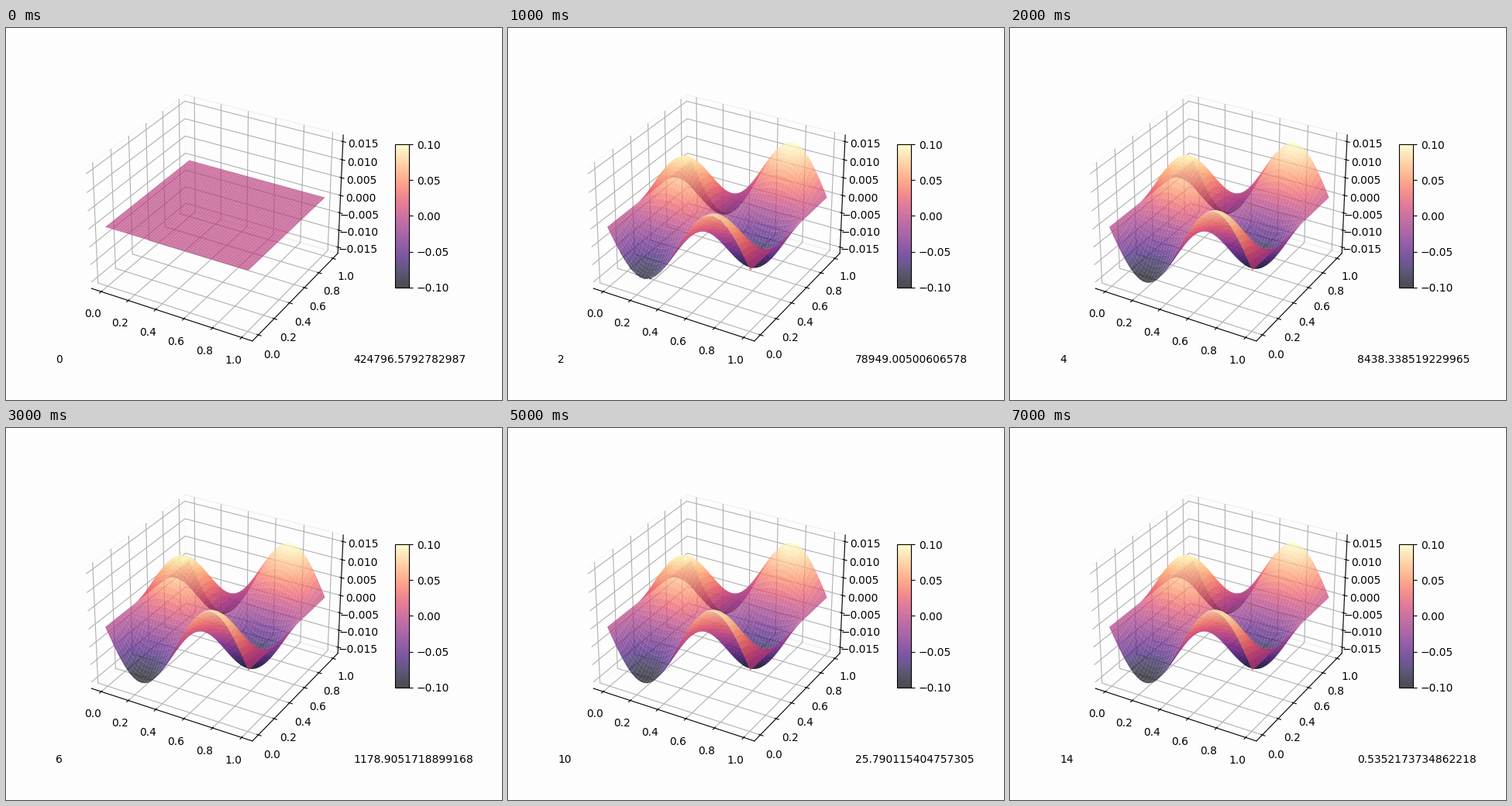
These frames come from a looping animation (640 by 480 pixels, 7.5 s). A matplotlib script:

```python
import numpy as np
import matplotlib.pyplot as plt
from matplotlib.animation import FuncAnimation
from matplotlib.cm import ScalarMappable
from matplotlib.colors import Normalize

BG = "#fdfdfd"
ALPHA = 0.7
N = 344
RESIDUALS = [
    "424796.5792782987", "285250.62804298", "78949.00500606578",
    "25810.416283759142", "8438.338519229965", "3154.086127395418",
    "1178.9051718899168", "453.44871930562817", "174.39562081734925",
    "67.07218435190264", "25.790115404757305", "9.790245318672049",
    "3.716382905147263", "1.4106529384710562", "0.5352173734862218",
]

grid = np.linspace(0, 1, N)
X, Y = np.meshgrid(grid, grid)
EXACT = -np.sin(2 * np.pi * X) * np.cos(2 * np.pi * Y) / (8 * np.pi**2)


def solution(step):
    """Iterate of the solver: the error shrinks and is roughest at y = 0 and 1."""
    if step == 0:
        return np.zeros_like(EXACT)
    rng = np.random.default_rng(step)
    lag = 0.28 * 0.33 ** (step - 1) * (1 - Y) ** 2
    over = 0.10 * 0.1 ** (step - 1) * Y**3
    rough = 0.05 * 0.22 ** (step - 1) * np.abs(2 * Y - 1) ** 6
    return EXACT * (1 - lag + over + rough * rng.standard_normal(EXACT.shape))


fig = plt.figure(figsize=(6.4, 4.8), dpi=100, facecolor=BG)
ax = fig.add_subplot(projection="3d", facecolor=BG)
for axis in (ax.xaxis, ax.yaxis, ax.zaxis):
    axis.pane.fill = False

pad = 0.05 + 1.1 / 48
ax.set_xlim(-pad, 1 + pad)
ax.set_ylim(-pad, 1 + pad)
ax.set_zlim(-0.0168, 0.0168)

fig.colorbar(ScalarMappable(Normalize(-0.1, 0.1), "magma"), ax=ax,
             alpha=ALPHA, shrink=0.5, aspect=10, pad=0.1)
step_text = fig.text(0.1, 0.1, "")
residual_text = fig.text(0.7, 0.1, "")
surfaces = []


def update(step):
    while surfaces:
        surfaces.pop().remove()
    surf = ax.plot_surface(X, Y, solution(step), cmap="magma", alpha=ALPHA)
    if step == 0:
        surf.set_clim(-0.1, 0.1)
    surfaces.append(surf)
    step_text.set_text(str(step))
    residual_text.set_text(RESIDUALS[step])
    return surf, step_text, residual_text


anim = FuncAnimation(fig, update, frames=len(RESIDUALS), interval=500,
                     repeat=True, repeat_delay=0, blit=False)
plt.show()
```
